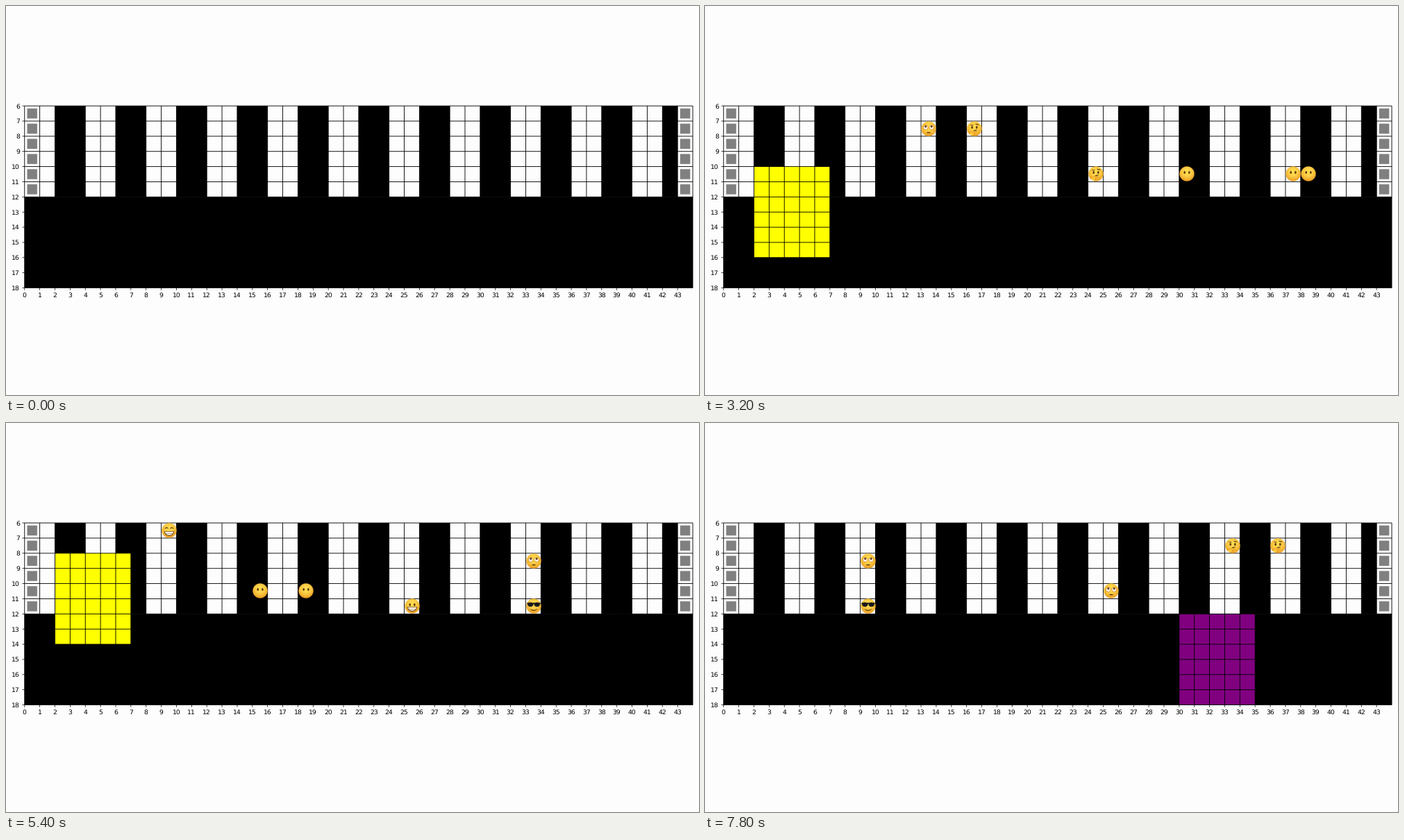
A matplotlib script that plays this animation: 998x561 px, repeating every 8 s.

```python
import numpy as np
import matplotlib.pyplot as plt
from matplotlib.animation import FuncAnimation
from matplotlib.patches import Rectangle

plt.rcParams["text.hinting"] = "none"

W, H, DPI = 998, 561, 100
STEPS, STEP_MS = 40, 200
COLS, TOP, CURB, BOTTOM = 44, 6, 12, 18
LAST = COLS - 1
X0, Y0, CELL = 26.75, 144.1, 21.87
PAPER = "#fdfdfd"


def px(points):
    """Pixels to typographic points."""
    return points * 72 / DPI


def cx(col):
    return X0 + CELL * col


def cy(row):
    return Y0 + CELL * (row - TOP)


# ---------- faces ----------
N = 96
GY, GX = np.mgrid[-1:1:N * 1j, -1:1:N * 1j]
BROWN, INK, IVORY, GOLD, RUST = "#5c340a", "#19191c", "#fffaf0", "#ffc83a", "#cd7814"


def oval(x, y, rx, ry, tilt=0.0):
    c, s = np.cos(tilt), np.sin(tilt)
    u, v = GX - x, GY - y
    return ((u * c + v * s) / rx) ** 2 + ((v * c - u * s) / ry) ** 2 <= 1


def pair(x, y, rx, ry):
    return oval(-x, y, rx, ry) | oval(x, y, rx, ry)


def face(*layers):
    """A shaded ball with (mask, colour) layers painted on top."""
    img = np.ones((N, N, 4))
    depth = np.clip(np.hypot(GX, GY + 0.25) / 1.25, 0, 1)[..., None] ** 2
    light, dark = (np.array(plt.matplotlib.colors.to_rgb(c))
                   for c in ("#ffdc50", "#ea961e"))
    img[..., :3] = light + (dark - light) * depth
    img[..., 3] = np.hypot(GX, GY) <= 0.98
    for mask, color in layers:
        img[mask, :3] = plt.matplotlib.colors.to_rgb(color)
    return img


EYES = pair(0.3, -0.18, 0.12, 0.18), BROWN
HAPPY = pair(0.35, -0.22, 0.22, 0.22) & ~pair(0.35, -0.12, 0.2, 0.2) & (GY < -0.15)
MOUTH = oval(0, 0.1, 0.66, 0.62) & (GY > 0.1), BROWN
TEETH = (oval(0, 0.1, 0.58, 0.52) & (GY > 0.17) & (abs(GY - 0.4) > 0.03), IVORY)
SMILE = oval(0, 0.25, 0.5, 0.38) & ~oval(0, 0.15, 0.55, 0.36), BROWN
SHADES = (pair(0.43, -0.2, 0.38, 0.29)
          | ((abs(GX) < 0.9) & (abs(GY + 0.36) < 0.08)), INK)


def hand(grow):
    return (oval(-0.4, 0.7, 0.3 + grow, 0.24 + grow)
            | oval(-0.1, 0.5, 0.38 + grow, 0.08 + grow, -0.2))


FACES = {
    "silent": face(EYES),
    "rolling": face((pair(0.39, -0.17, 0.33, 0.33), RUST),
                    (pair(0.39, -0.17, 0.27, 0.27), IVORY),
                    (pair(0.39, -0.29, 0.13, 0.14), BROWN),
                    (oval(0, 0.52, 0.28, 0.07), BROWN)),
    "thinking": face(EYES, (oval(0.36, -0.56, 0.26, 0.06, 0.25), BROWN),
                     (oval(-0.34, -0.48, 0.22, 0.05), BROWN),
                     (oval(0.1, 0.22, 0.26, 0.06, -0.2), BROWN),
                     (hand(0.05), RUST), (hand(0), GOLD)),
    "grinning": face(EYES, MOUTH, TEETH),
    "beaming": face((HAPPY, BROWN), MOUTH, TEETH),
    "shaded": face(SHADES, SMILE),
}

# ---------- traffic ----------
# walkers: face, row, step of entry, signed top speed in cells per step
WALKERS = [
    ("rolling", 7, 1, -2), ("silent", 10, 3, 3), ("thinking", 7, 4, -3),
    ("silent", 10, 6, 3), ("thinking", 10, 8, 3), ("silent", 10, 13, -2),
    ("silent", 10, 17, -3), ("grinning", 11, 18, 3), ("rolling", 8, 22, -2),
    ("shaded", 11, 22, -2), ("beaming", 6, 24, 3), ("rolling", 10, 30, -2),
    ("thinking", 7, 34, -2), ("thinking", 7, 36, -3),
]
# cars: step of entry, lane, colour
CARS = [(6, 5, "lime"), (15, 0, "yellow"), (25, 0, "yellow"),
        (34, 0, "yellow"), (39, 4, "purple")]
CAR_W, CAR_L = 5, 6


def lane_col(lane):
    return 2 + 7 * lane


def nose(start, step):
    """Front row of a car: two rows per step, three once past the zebra."""
    k = step - start
    return CURB - 2 * k - max(0, k - 3)


def reach(i, pos, step):
    """Cells walker i can advance, given everything ahead in its row."""
    _, row, _, speed = WALKERS[i]
    way = np.sign(speed)
    # those going right also wait for oncoming walkers
    ahead = [pos[j] for j in pos if WALKERS[j][1] == row
             and (WALKERS[j][3] * way > 0 or way > 0)]
    for start, lane, _ in CARS:
        front = nose(start, step)
        if step >= start and TOP <= front <= row < front + CAR_L:
            ahead += range(lane_col(lane), lane_col(lane) + CAR_W)
    gaps = [(col - pos[i]) * way - 1 for col in ahead if (col - pos[i]) * way > 0]
    return way * min([abs(speed)] + gaps)


def simulate():
    pos, history = {}, []
    for step in range(STEPS):
        moved = {i: pos[i] + reach(i, pos, step - 1) for i in pos}
        pos = {i: col for i, col in moved.items() if 0 <= col <= LAST}
        for i, (_, _, entry, speed) in enumerate(WALKERS):
            if entry == step:
                pos[i] = 0 if speed > 0 else LAST
        history.append(pos)
    return history


HISTORY = simulate()

# ---------- stage ----------
fig = plt.figure(figsize=(W / DPI, H / DPI), dpi=DPI, facecolor=PAPER)
ax = fig.add_axes([0, 0, 1, 1])
ax.axis("off")


def block(col, row, w, h, color, z):
    return ax.add_patch(Rectangle((cx(col), cy(row)), w * CELL, h * CELL,
                                  fc=color, lw=0, zorder=z, snap=False))


def line(xs, ys, width=0.9):
    ax.plot(xs, ys, color="black", lw=px(width), zorder=4, snap=False,
            solid_capstyle="butt")


def label(x, y, value, ha, va):
    ax.text(x, y, str(value), fontsize=px(9.3), ha=ha, va=va,
            family="DejaVu Sans")


block(0, CURB, COLS, BOTTOM - CURB, "black", 1)
for col in range(2, LAST, 4):
    block(col, TOP, min(2, LAST - col), CURB - TOP, "black", 1)

for row in range(TOP, BOTTOM + 1):
    line([cx(0), cx(COLS)], [cy(row)] * 2)
    line([cx(0) - 3.3, cx(0)], [cy(row)] * 2, 0.75)
    label(cx(0) - 6.5, cy(row), row, "right", "center_baseline")
for col in range(COLS + 1):
    line([cx(col)] * 2, [cy(TOP), cy(BOTTOM)])
    if col < COLS:
        line([cx(col)] * 2, [cy(BOTTOM), cy(BOTTOM) + 3.3], 0.75)
        label(cx(col), cy(BOTTOM) + 6.5, col, "center", "top")

for col in (0, LAST):
    for row in range(TOP, CURB):
        block(col + 0.17, row + 0.17, 0.66, 0.66, "#808080", 5)

cars = [block(lane_col(lane), CURB, CAR_W, CAR_L, color, 2)
        for _, lane, color in CARS]
sprites = [ax.imshow(FACES[name], extent=(0, 1, 1, 0), aspect="auto",
                     interpolation="hanning", zorder=6, visible=False)
           for name, *_ in WALKERS]
ax.set_xlim(0, W)
ax.set_ylim(H, 0)


def draw(step):
    for car, (start, _, _) in zip(cars, CARS):
        front = nose(start, step)
        shown = step >= start and front + CAR_L > TOP
        car.set_visible(shown)
        if shown:
            car.set_y(cy(max(front, TOP)))
            car.set_height((front + CAR_L - max(front, TOP)) * CELL)
    for i, sprite in enumerate(sprites):
        col = HISTORY[step].get(i, 0)
        sprite.set_visible(0 < col < LAST)
        x, y, r = cx(col + 0.5), cy(WALKERS[i][1] + 0.5), 10.8
        sprite.set_extent((x - r, x + r, y + r, y - r))
    return cars + sprites


anim = FuncAnimation(fig, draw, frames=STEPS, interval=STEP_MS,
                     init_func=lambda: draw(0), repeat=True, blit=False)
plt.show()
```
